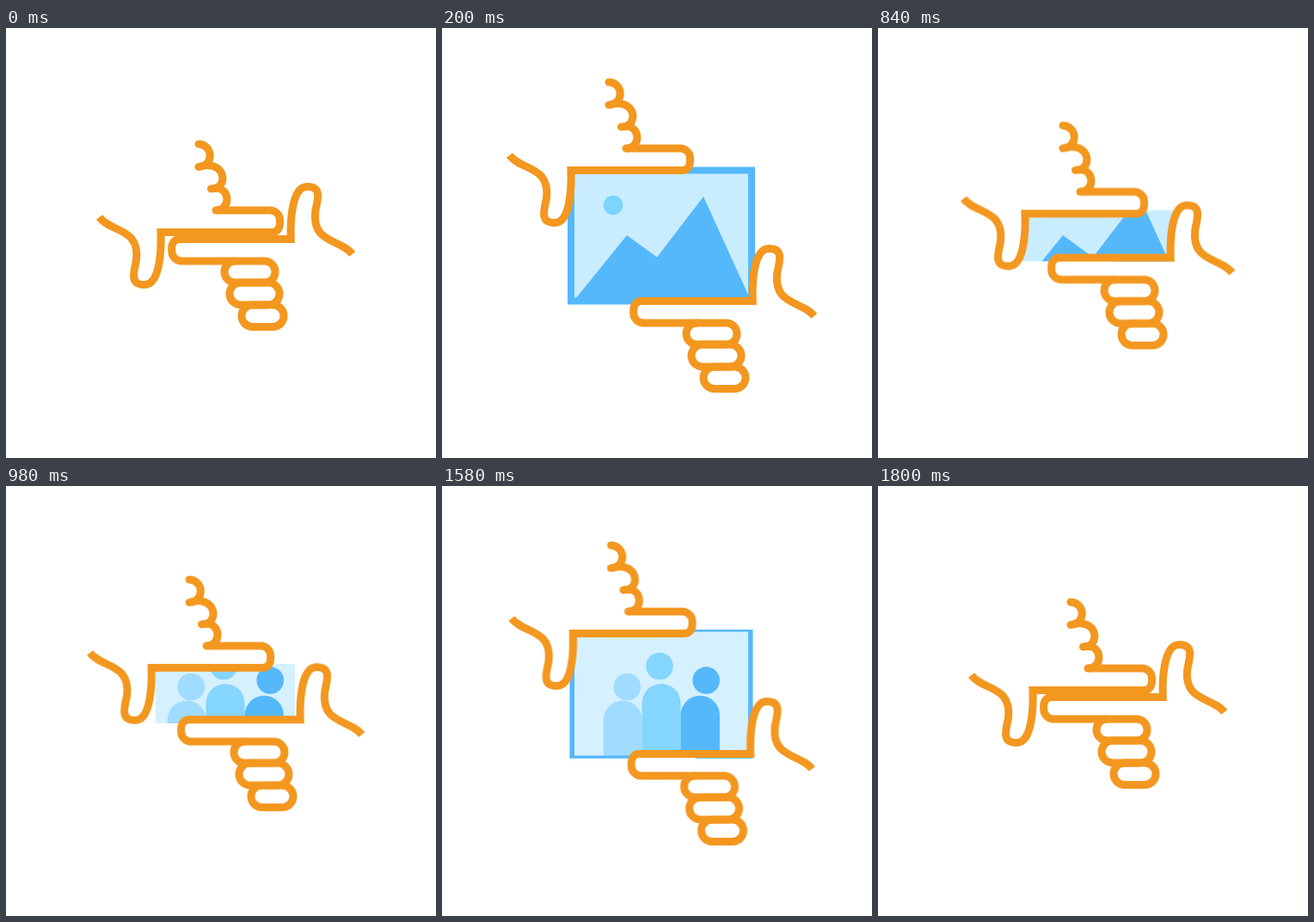
Write an HTML page that moves like this. It is 500 by 500 pixels and loops after 1.82 s.

```html
<!DOCTYPE html>
<html lang="en">
<head>
<meta charset="utf-8">
<title>Framing hands</title>
<style>
  html, body { margin: 0; width: 100%; height: 100%; overflow: hidden; background: #fff; }
  body { position: relative; }
  svg { position: absolute; left: 0; top: 0; width: 500px; height: 500px; }

  :root {
    --open: inset(161px 136px 177px 146px);
    --shut: inset(234px 180px 251px 191px);
    --closing: inset(234px 166px 251px 176px);
  }

  .picture, .people, .hand { animation: 1820ms -1ms infinite; }
  .picture { animation-name: crop; }
  .people { animation-name: swap; animation-timing-function: step-end; }
  .hand { animation-name: slide; fill: none; stroke: #f3971f; stroke-width: 9; }
  .upper { --dx: 30px; --dy: 72px; }
  .lower { --dx: -30px; --dy: -72px; }
  .finger { fill: #fff; stroke: none; }
  .curls { stroke-linecap: round; stroke-linejoin: round; }

  /* Loop marks: 200, 700, 900, 1120, 1560 and 1800 ms; 20 ms per step */
  @keyframes slide {
    0% { transform: translate(var(--dx), var(--dy)); animation-timing-function: steps(10); }
    10.989%, 38.4615% { transform: translate(0, 0); animation-timing-function: steps(10); }
    49.4505% { transform: translate(var(--dx), var(--dy)); animation-timing-function: steps(11); }
    61.5385%, 85.7143% { transform: translate(0, 0); animation-timing-function: steps(12); }
    98.9011%, 100% { transform: translate(var(--dx), var(--dy)); }
  }
  @keyframes crop {
    0% { clip-path: var(--shut); visibility: hidden; animation-timing-function: steps(10); }
    10.989%, 38.4615% { clip-path: var(--open); visibility: visible; animation-timing-function: steps(10); }
    49.45% { clip-path: var(--closing); visibility: visible; }
    49.4505% { clip-path: var(--shut); visibility: hidden; animation-timing-function: steps(11); }
    61.5385%, 85.7143% { clip-path: var(--open); visibility: visible; animation-timing-function: steps(12); }
    98.9% { clip-path: var(--closing); visibility: visible; }
    98.9011%, 100% { clip-path: var(--shut); visibility: hidden; }
  }
  @keyframes swap {
    0% { opacity: 0; }
    49.4505%, 100% { opacity: 1; }
  }
</style>
</head>
<body>
<svg class="picture" viewBox="0 0 500 500">
  <g class="landscape">
    <rect x="150" y="165.5" width="210" height="152" fill="#c9ecff"/>
    <circle cx="199" cy="206" r="11.3" fill="#7ad5ff"/>
    <path d="M155.5 314.5L215 241L250 266.5L304 196L358 314.5Z" fill="#54b8fb"/>
  </g>
  <g class="people">
    <rect x="150" y="165.5" width="210" height="152" fill="#d5f0ff"/>
    <g fill="#9fdcff">
      <circle cx="215.3" cy="233.5" r="15.8"/>
      <path d="M187.7 315V272a22.5 22.5 0 0 1 45 0V315Z"/>
    </g>
    <g fill="#84d5ff">
      <circle cx="253" cy="209.5" r="15.8"/>
      <path d="M232.5 315V252.5a22.5 22.5 0 0 1 45 0V315Z"/>
    </g>
    <g fill="#54b8fb">
      <circle cx="307.2" cy="226" r="15.8"/>
      <path d="M277.5 315V266.5a22.7 22.7 0 0 1 45.4 0V315Z"/>
    </g>
  </g>
  <rect x="150" y="165.5" width="210" height="152" fill="none" stroke="#54b8fb" stroke-width="8"/>
</svg>

<svg class="hands" viewBox="0 0 500 500">
  <defs>
    <g id="grip">
      <path class="finger" d="M214 140H277a11.5 11.5 0 0 1 11.5 11.5v3c0 6-3 11-9 11H214Z"/>
      <path d="M214 140H277a11.5 11.5 0 0 1 11.5 11.5v3c0 6-3 11-9 11H150
               C150.5 180 150.5 226.5 131 226.5C113 226.5 119 211 121.5 198
               C126 160 92 166 78.5 148"/>
    </g>
  </defs>
  <g class="hand upper">
    <use href="#grip"/>
    <path class="curls" d="M194 63a13.25 13.25 0 0 1 0 26.5C226 80 230 115 208.5 115
                           C231 109 233 140 214 140"/>
  </g>
  <g class="hand lower">
    <use href="#grip" transform="rotate(180 255.6 241.5)"/>
    <rect x="284" y="343" width="59" height="25" rx="12.5"/>
    <rect x="290" y="368" width="58" height="26" rx="13"/>
    <rect x="304" y="394" width="49" height="25.5" rx="12.7"/>
  </g>
</svg>
</body>
</html>
```
